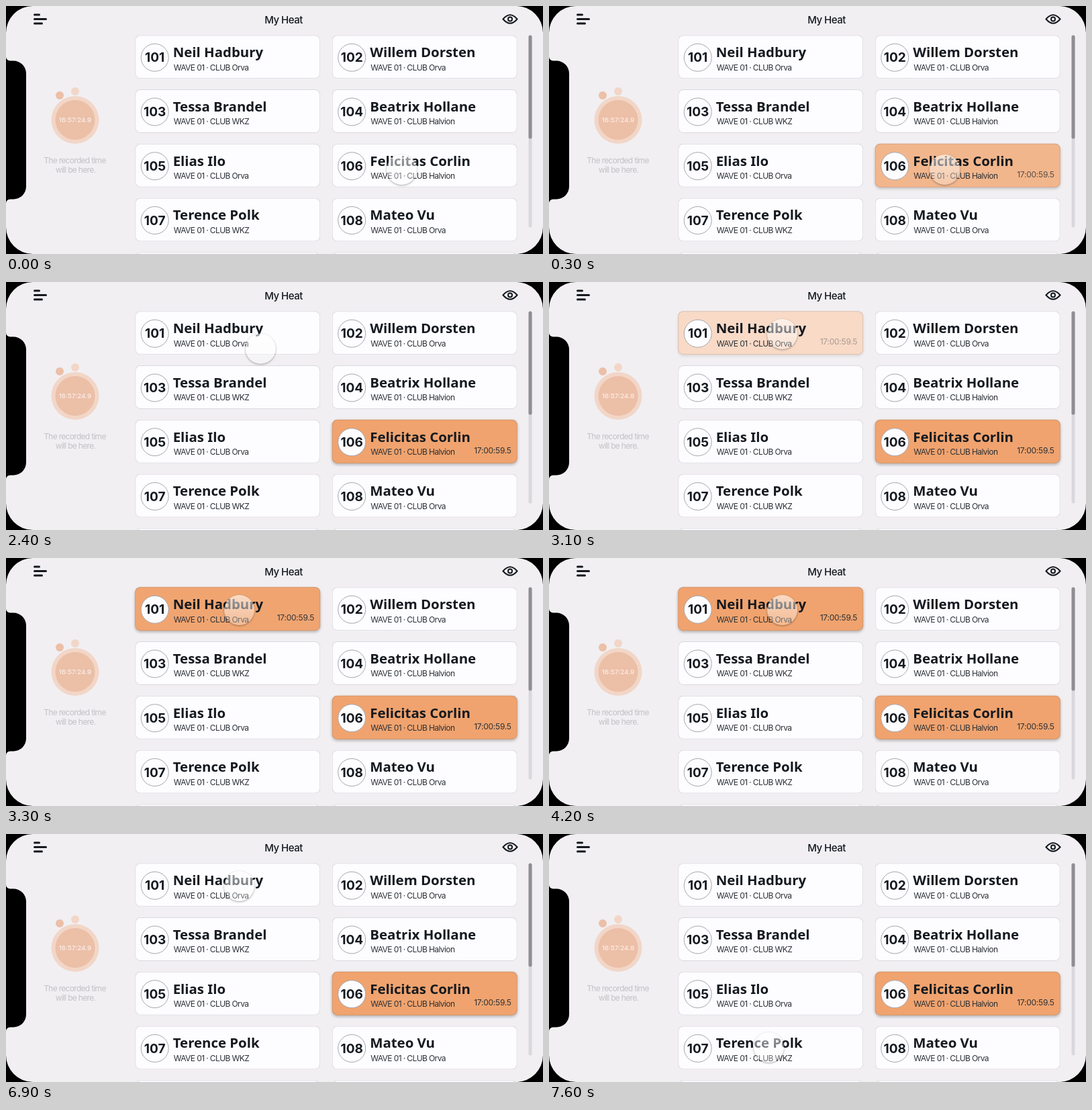
An HTML page for the animation above (7.7 s loop, 800 by 369 pixels).

```html
<!DOCTYPE html>
<html lang="en">
<head>
<meta charset="utf-8">
<title>Race timing</title>
<style>
html, body { margin: 0; width: 100%; height: 100%; overflow: hidden; background: #f1eff2; }
body { position: relative; }
svg { position: absolute; left: 0; top: 0; overflow: visible; }
text { font-family: Inter, sans-serif; fill: #14191f; }
.card, .hot { position: absolute; left: 0; top: 0; box-sizing: border-box; width: 276px; height: 65px; border-radius: 8px; }
.card { --on: 0; background: #fdfcfe; box-shadow: inset 0 0 0 1px #d9d8dd; }
.hot { background: #f0a36e; box-shadow: inset 0 0 0 1px #d4976f, 0 2px 4px rgba(0, 0, 0, .28); }
.hot, .time { opacity: var(--on); }
.number { font-size: 19px; font-weight: 700; text-anchor: middle; }
.name { font: 600 20.4px "Noto Sans", sans-serif; }
.club, .time, .hint { font-size: 12px; letter-spacing: -.6px; fill: #2b3036; }
.time { letter-spacing: -.25px; text-anchor: end; }
.hint { letter-spacing: -.7px; fill: #c3c1c5; text-anchor: middle; }
#cursor {
  position: absolute; left: -22.5px; top: -22.5px; width: 45px; height: 45px; border-radius: 50%;
  background: linear-gradient(rgba(255, 255, 255, .6), rgba(255, 255, 255, .25));
  box-shadow: 0 1px 3px rgba(0, 0, 0, .35);
}
</style>
</head>
<body>
<svg width="800" height="369">
  <g fill="none" stroke="#14191f" stroke-linecap="round">
    <path stroke-width="3" d="M42.5 13H49.5M42.5 19.5H59.5M42.5 26H53.5"/>
    <path stroke-width="2" d="M740.5 19.5Q751 7 761.5 19.5Q751 32 740.5 19.5Z"/>
    <circle stroke-width="2" cx="751" cy="19.5" r="3"/>
  </g>
  <text x="413.5" y="25.5" font-size="15" font-weight="500" letter-spacing="-.5" text-anchor="middle">My Heat</text>
  <circle cx="103" cy="127" r="6" fill="#f2d6c7"/>
  <circle cx="80" cy="133" r="6" fill="#ecbfa7"/>
  <circle cx="103" cy="169.5" r="35.5" fill="#f2d6c7"/>
  <circle cx="103" cy="169.5" r="29.5" fill="#ecbfa7"/>
  <text x="103" y="173" font-size="9.6" font-weight="600" text-anchor="middle" style="fill:#f8e9e0">16:57:24.9</text>
  <text class="hint" x="102.5" y="234">The recorded time</text>
  <text class="hint" x="103.5" y="248">will be here.</text>
  <g stroke-width="5" stroke-linecap="round">
    <path stroke="#d9d8dc" d="M781 46V327"/>
    <path stroke="#8f8e93" d="M781 46V195"/>
  </g>
</svg>
<div id="cards"></div>
<div id="cursor"></div>
<svg width="800" height="369">
  <path fill-rule="evenodd" d="M0 0H800V369H0ZM40 0A40 40 0 0 0 0 40V329A40 40 0 0 0 40 369H760A40 40 0 0 0 800 329V40A40 40 0 0 0 760 0Z"/>
  <path d="M0 75.5A6 6 0 0 0 6 81.5H11A19 19 0 0 1 30 100.5V268.5A19 19 0 0 1 11 287.5H6A6 6 0 0 0 0 293.5Z"/>
</svg>
<script>
const LOOP = 7700, STEP = 100;
const entrants = [
  ['Neil Hadbury', 'Orva'], ['Willem Dorsten', 'Orva'],
  ['Tessa Brandel', 'WKZ'], ['Beatrix Hollane', 'Halvion'],
  ['Elias Ilo', 'Orva'], ['Felicitas Corlin', 'Halvion'],
  ['Terence Polk', 'WKZ'], ['Mateo Vu', 'Orva'],
  ['', ''], ['', '']
];

document.getElementById('cards').innerHTML = entrants.map(([name, club], i) => {
  const x = i % 2 ? 485.7 : 192.2;
  const y = 43.2 + 80.75 * Math.floor(i / 2);
  return `<div class="card" style="transform:translate(${x}px,${y}px)">
    <div class="hot"></div>
    <svg width="276" height="65">
      <circle cx="29.5" cy="33.5" r="20.5" fill="#fdfcfe" stroke="#a6a6ad"/>
      <text class="number" x="29.5" y="40.3">${101 + i}</text>
      <text class="name" x="56.5" y="33">${name}</text>
      <text class="club" x="57.5" y="52.5">WAVE 01 · CLUB ${club}</text>
      <text class="time" x="267" y="50">17:00:59.5</text>
    </svg>
  </div>`;
}).join('');

const cards = document.querySelectorAll('.card');
const cursor = document.getElementById('cursor');

// Eased progress from 0 to 1 between two times, with a quick start.
function progress(t, start, end) {
  const u = Math.min(1, Math.max(0, (t - start) / (end - start))) ** 0.7;
  return u * u * (3 - 2 * u);
}

function draw(now) {
  const t = Math.floor(now % LOOP / STEP) * STEP;
  cards[5].style.setProperty('--on', progress(t, 0, 500));
  cards[0].style.setProperty('--on', progress(t, 3000, 3350) - progress(t, 5920, 6420));

  const toFirst = progress(t, 1500, 2800);
  const toFourth = progress(t, 6900, 7600);
  const x = 589 - 242 * toFirst - 20 * toFourth;
  const y = 243 - 166 * toFirst + 240 * toFourth;
  cursor.style.transform = `translate(${x}px, ${y}px)`;
}

const began = performance.now();
function frame() {
  draw(performance.now() - began);
  requestAnimationFrame(frame);
}
frame();
</script>
</body>
</html>
```
